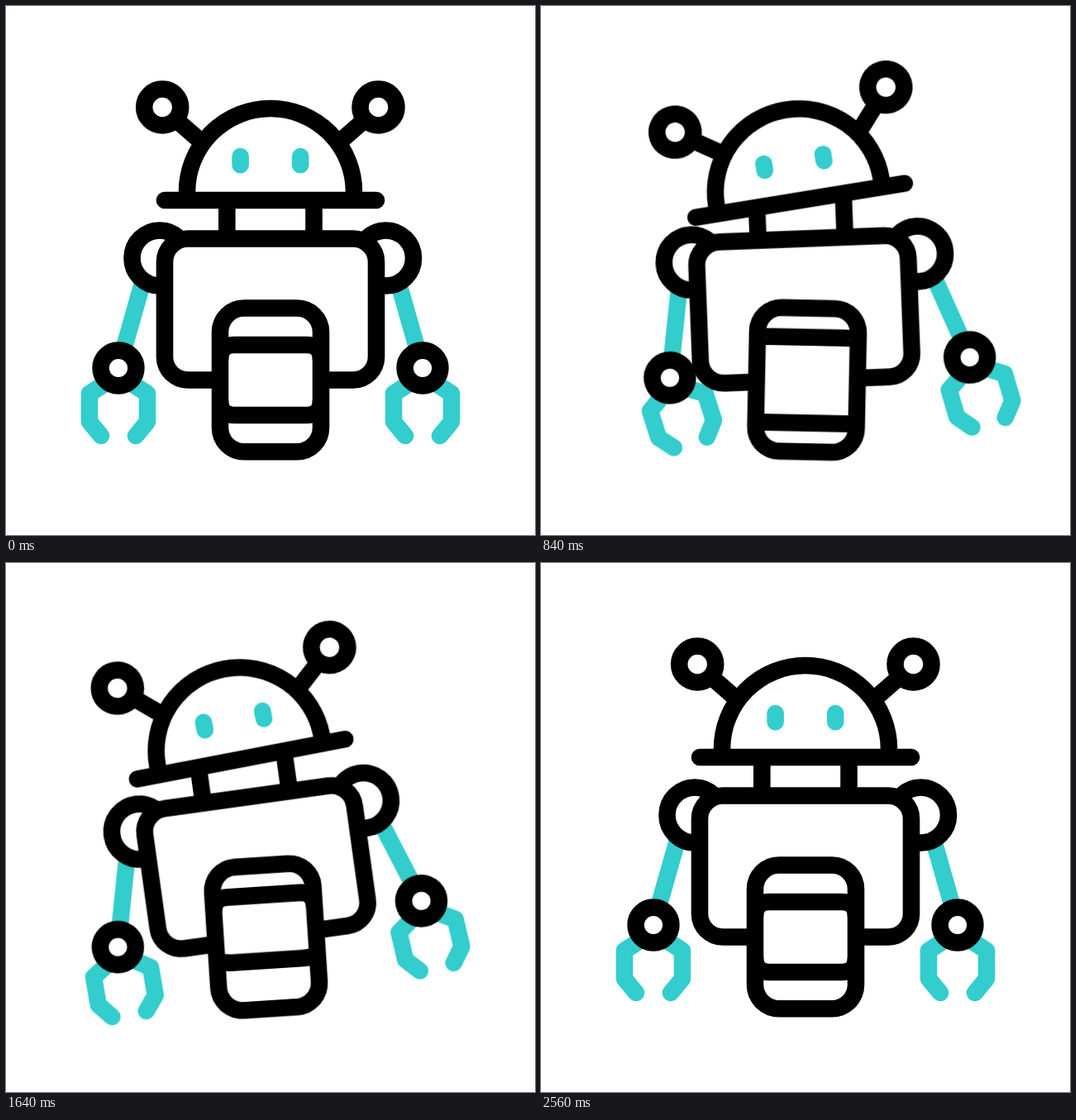
Recreate the animation shown at these times as an HTML page without scripts. Size 640x640 px, loop 2.64 s.

```html
<!DOCTYPE html>
<html lang="en">
<head>
<meta charset="utf-8">
<title>Rocking robot</title>
<style>
html, body { margin: 0; width: 100%; height: 100%; overflow: hidden; background: #fff; }
svg { display: block; width: 100%; height: 100%; }

.ink, .teal { stroke-width: 20.6; }
.ink { fill: #fff; stroke: #000; }
.teal, .line { fill: none; }
.teal { stroke: #33cdcd; }
.round { stroke-linecap: round; stroke-linejoin: round; }

/* Every joint plays the same damped swing, later the further it is from the ground. */
.swing, .eyes, .tread {
  animation: swing 2.64s cubic-bezier(.333, 0, .667, 1) var(--lag) infinite;
}
.eyes { animation-name: squint; transform-origin: 320px 202.6px; --lag: 0s; }
.tread { --lag: 0s; }
.upper { animation-name: upper; }
.lower { animation-name: lower; }

.base     { transform-origin: 320px 539px; --lag: 0s; }
.torso    { transform-origin: 320px 452px; --lag: .12s; }
.head     { transform-origin: 320px 235px; --lag: .24s; }
.antennaL { transform-origin: 236px 164px; --lag: .36s; }
.antennaR { transform-origin: 404px 164px; --lag: .36s; }
.armL     { transform-origin: 186px 305px; --lag: .28s; }
.armR     { transform-origin: 459.5px 305px; --lag: .2s; }
.clawL    { transform-origin: 136px 438px; --lag: .38s; }
.clawR    { transform-origin: 504px 438px; --lag: .3s; }

@keyframes swing {
  0%, 78.8%, 100% { transform: rotate(0deg); }
  19.7% { transform: rotate(-8deg); }
  38.3% { transform: rotate(4.7deg); }
  57.6% { transform: rotate(-4.2deg); }
}
@keyframes squint {
  0%, 91%, 100% { transform: scaleY(1); }
  25% { transform: scaleY(.71); }
  39.4% { transform: scaleY(1.18); }
  53% { transform: scaleY(.86); }
  71.2% { transform: scaleY(1.1); }
}
/* Treads flatten as they pass the middle or the ends of the wheel. */
@keyframes upper {
  0%, 92%, 100% { d: path("M259 428Q259 410 277 410H363Q381 410 381 428"); }
  13.64% { d: path("M259 461Q259 461 277 461H363Q381 461 381 461"); }
  22.73% { d: path("M259 429Q259 427 277 427H363Q381 427 381 429"); }
  39.39% { d: path("M259 381Q259 381 277 381H363Q381 381 381 381"); }
  53.03% { d: path("M259 444Q259 426 277 426H363Q381 426 381 444"); }
  71.21% { d: path("M259 395Q259 377 277 377H363Q381 377 381 395"); }
}
@keyframes lower {
  0%, 92%, 100% { d: path("M259 477Q259 495 277 495H363Q381 495 381 477"); }
  13.64% { d: path("M259 534Q259 534 277 534H363Q381 534 381 534"); }
  22.73% { d: path("M259 522Q259 524 277 524H363Q381 524 381 522"); }
  39.39% { d: path("M259 490Q259 490 277 490H363Q381 490 381 490"); }
  53.03% { d: path("M259 491Q259 509 277 509H363Q381 509 381 491"); }
  71.21% { d: path("M259 453Q259 453 277 453H363Q381 453 381 453"); }
}
</style>
</head>
<body>
<svg viewBox="0 0 640 640">
  <defs>
    <path id="claw" class="teal round" d="M-12 16L-35 31V65L-21 82M12 16L35 31V65L21 82"/>
    <circle id="elbow" class="ink" r="21.4"/>
    <circle id="bulb" class="ink" r="22"/>
    <circle id="shoulder" class="ink" r="33.5"/>
    <rect id="wheel" x="259" y="365.5" width="122" height="173.8" rx="29"/>
    <clipPath id="tyre"><use href="#wheel"/></clipPath>
  </defs>

  <g class="swing base">
    <g class="swing torso">
      <g class="swing armL">
        <path class="teal" d="M168 325L137 434"/>
        <g class="swing clawL"><use href="#claw" x="136" y="438"/></g>
        <use href="#elbow" x="136" y="438"/>
      </g>
      <g class="swing armR">
        <path class="teal" d="M472 325L503 434"/>
        <g class="swing clawR"><use href="#claw" x="504" y="438"/></g>
        <use href="#elbow" x="504" y="438"/>
      </g>
      <use href="#shoulder" x="186" y="305"/>
      <use href="#shoulder" x="459.5" y="305"/>
      <path class="ink" d="M267.3 235V281M372.5 235V281"/>
      <rect class="ink" x="192" y="281.5" width="256" height="171" rx="28"/>

      <g class="swing head">
        <g class="swing antennaL">
          <path class="ink" d="M204 136L236 164"/>
          <use href="#bulb" x="189.2" y="122.5"/>
        </g>
        <g class="swing antennaR">
          <path class="ink" d="M436 136L404 164"/>
          <use href="#bulb" x="450.5" y="122.5"/>
        </g>
        <path class="ink" d="M219 235V225A101 101 0 0 1 421 225V235"/>
        <path class="ink round" d="M192 235H448"/>
        <path class="teal round eyes" d="M283.6 182V192.3M356.2 182V192.3"/>
      </g>
    </g>

    <use href="#wheel" class="ink"/>
    <g clip-path="url(#tyre)">
      <path class="ink line tread upper" d="M259 428Q259 410 277 410H363Q381 410 381 428"/>
      <path class="ink line tread lower" d="M259 477Q259 495 277 495H363Q381 495 381 477"/>
    </g>
  </g>
</svg>
</body>
</html>
```
